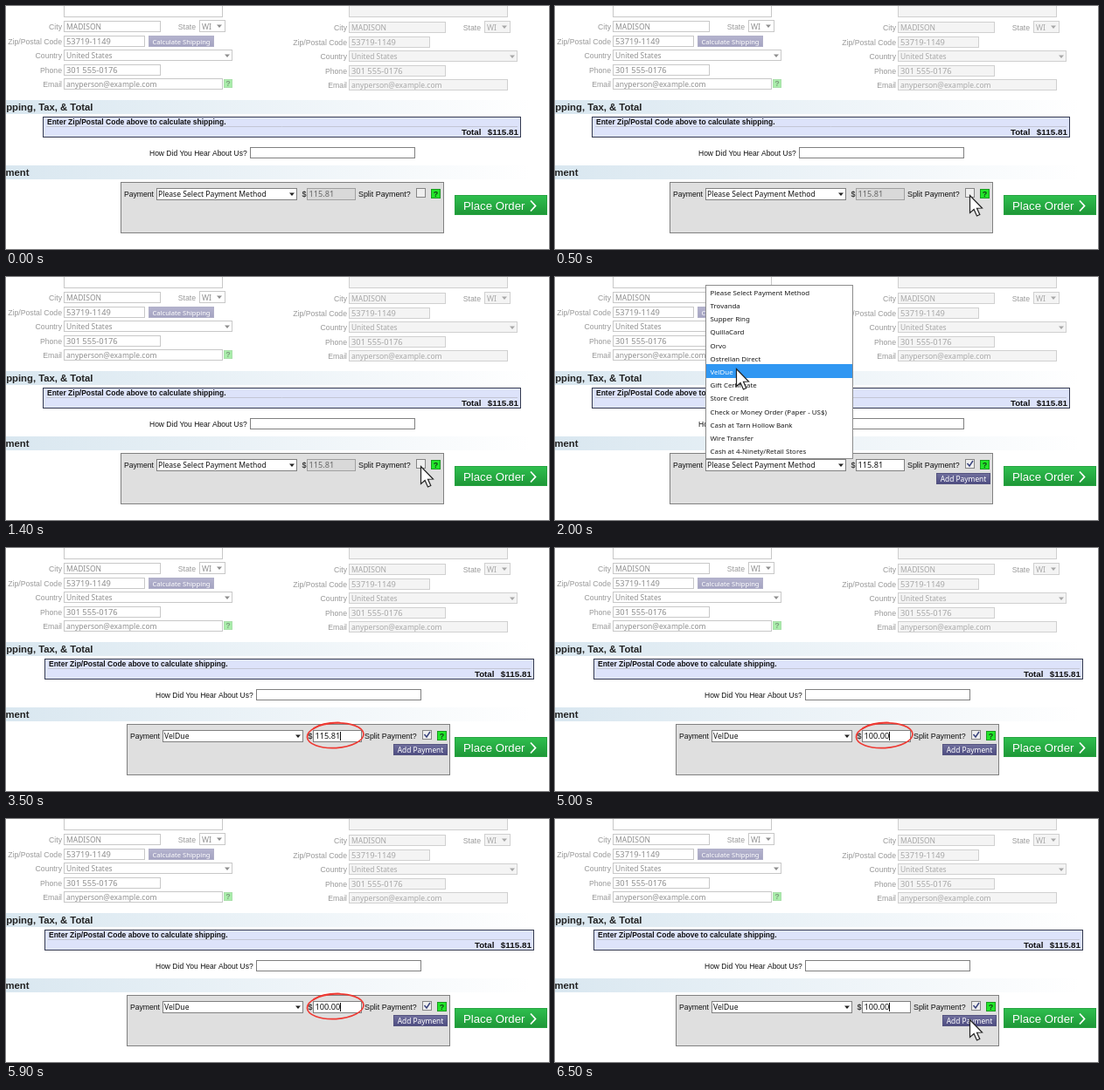
Animation, 621 px wide and 279 px high, one loop 8 s. Source, as an HTML page with a canvas:

```html
<!DOCTYPE html>
<html lang="en">
<head>
<meta charset="utf-8">
<title>Split payment checkout</title>
<style>
html, body { margin: 0; width: 100%; height: 100%; overflow: hidden; background: #fff; }
canvas { display: block; width: 621px; height: 279px; }
</style>
</head>
<body>
<canvas id="stage" width="621" height="279"></canvas>
<script>
const ctx = document.getElementById("stage").getContext("2d");
const LOOP = 8000;
const SANS = '"Liberation Sans", Arial, sans-serif';
const FORM = '"Noto Sans", "Open Sans", sans-serif';
const EDGE = "#808080";
const METHOD = "VelDue";
const OPTIONS = [
  "Please Select Payment Method", "Trovanda", "Supper Ring", "QuillaCard", "Orvo",
  "Ostrellan Direct", METHOD, "Gift Certificate", "Store Credit",
  "Check or Money Order (Paper - US$)", "Cash at Tarn Hollow Bank",
  "Wire Transfer", "Cash at 4-Ninety/Retail Stores"
];

// Each step holds until the next one starts.
const STEPS = [
  { at: 0, amount: "115.81" },
  { at: 500, amount: "115.81", cursor: [474, 217] },
  { at: 2000, amount: "115.81", split: true, open: true, cursor: [207, 105] },
  { at: 3500, amount: "115.81", split: true, chosen: true, ring: true },
  { at: 5000, amount: "100.00", split: true, chosen: true, ring: true },
  { at: 6500, amount: "100.00", split: true, chosen: true, cursor: [474, 230] }
];

function text(str, x, y, size, color = "#111", opt = {}) {
  ctx.font = `${opt.weight || "normal"} ${size}px ${opt.font || SANS}`;
  ctx.textAlign = opt.align || "left";
  ctx.fillStyle = color;
  ctx.fillText(str, x, y);
}

function formText(str, x, y, size, color, align) {
  text(str, x, y, size, color, { font: FORM, align });
}

function box(x, y, w, h, fill, border) {
  ctx.fillStyle = fill;
  ctx.fillRect(x, y, w, h);
  if (!border) return;
  ctx.strokeStyle = border;
  ctx.lineWidth = 1;
  ctx.strokeRect(x + 0.5, y + 0.5, w - 1, h - 1);
}

function shade(x0, y0, x1, y1, from, to) {
  const g = ctx.createLinearGradient(x0, y0, x1, y1);
  g.addColorStop(0, from);
  g.addColorStop(1, to);
  return g;
}

function line(points, color, width) {
  ctx.beginPath();
  points.forEach(([x, y]) => ctx.lineTo(x, y));
  ctx.strokeStyle = color;
  ctx.lineWidth = width;
  ctx.stroke();
}

function arrow(x, y, color) {
  ctx.beginPath();
  ctx.moveTo(x - 3, y - 1.5);
  ctx.lineTo(x + 3, y - 1.5);
  ctx.lineTo(x, y + 2);
  ctx.fillStyle = color;
  ctx.fill();
}

function help(x, y, size, fill, border, color) {
  box(x, y, size, size, fill, border);
  text("?", x + size / 2, y + size - 2, 9, color, { weight: "bold", align: "center" });
}

function button(str, x, y, w, size, top, bottom, border) {
  box(x, y, w, 13, shade(0, y, 0, y + 13, top, bottom), border);
  formText(str, x + w / 2, y + 9.6, size, "#fff", "center");
}

function address(x, dy, fill, border, ink) {
  const field = (label, value, y, w, size) => {
    text(label, x - 2, y + dy + 9.7, 8.7, "#999", { align: "right" });
    box(x, y + dy, w, 13, fill, border);
    formText(value, x + 3, y + dy + 9.8, size, ink);
  };
  box(x, -1, 182, 14, fill, border);
  field("City", "MADISON", 17, 111, 8.5);
  field("Zip/Postal Code", "53719-1149", 34, 93, 9.3);
  field("Country", "United States", 50, 193, 8.4);
  field("Phone", "301 555-0176", 67, 111, 9.3);
  field("Email", "anyperson@example.com", 83, 182, 8.5);
  arrow(x + 187, 57 + dy, ink);
  text("State", x + 151, 26.7 + dy, 8.7, "#999", { align: "right" });
  box(x + 155, 16 + dy, 30, 14, fill, border);
  formText("WI", x + 158, 26.8 + dy, 8.7, ink);
  arrow(x + 178, 23 + dy, ink);
}

function heading(str, y, right) {
  box(0, y, 621, 16, shade(0, 0, 600, 0, "#d9e7f0", "#ffffff"));
  text(str, right, y + 12.3, 11.3, "#222", { weight: "bold", align: "right" });
}

function totals(left, right) {
  box(left, 127, right - left, 24, "#dde3fa", "#34394f");
  line([[left + 4, 138.5], [right - 4, 138.5]], "#c3c6d4", 1);
  text("Enter Zip/Postal Code above to calculate shipping.", left + 5, 136, 8.5, "#111", { weight: "bold" });
  text("Total", right - 68, 148, 9.7, "#111", { weight: "bold" });
  text("$115.81", right - 3, 148, 9.9, "#111", { weight: "bold", align: "right" });
}

function payment(s, dx) {
  box(131 + dx, 202, 370, 59, "#dfdfdf", EDGE);
  text("Payment", 135 + dx, 218.5, 8.6);
  box(172 + dx, 209, 161, 14, "#fff", EDGE);
  formText(s.chosen ? METHOD : OPTIONS[0], 174 + dx, 219.3, 8.6, "#111");
  arrow(327 + dx, 216, "#222");
  text("$", 338.5 + dx, 219.3, 9);
  box(344 + dx, 209, 56, 14, s.split ? "#fff" : "#d9d9d9", s.split ? EDGE : "#a0a0a0");
  formText(s.amount, 346.5 + dx, 219.3, 9.2, s.split ? "#111" : "#666");
  if (s.chosen) box(382, 211, 1, 10, "#111");
  text("Split Payment?", 403 + dx, 219.3, 8.9);
  box(469 + dx, 209, 11, 11, "#efefef", "#858585");
  if (s.split) {
    line([[471.5 + dx, 214], [474 + dx, 217], [478 + dx, 211]], "#39437c", 1.5);
    button("Add Payment", 436 + dx, 225, 62, 8.4, "#73729f", "#4b4a80", "#555480");
  }
  help(486 + dx, 210, 11, "#22e52a", "#1c9a22", "#143c16");
}

function placeOrder() {
  box(513, 217, 106, 23, shade(0, 217, 0, 240, "#2fc04f", "#1d9636"), "#27a341");
  text("Place Order", 523, 234, 13.2, "#fff");
  line([[600, 223.5], [605.5, 229.5], [600, 235.5]], "#fff", 1.8);
}

function menu() {
  const pitch = 15.2;
  box(172, 9, 169, 200, "#fff", "#8c8c8c");
  OPTIONS.forEach((name, i) => {
    const picked = name === METHOD;
    if (picked) box(173, 100, 167, 16, "#3097f2");
    formText(name, 177.5, 20.8 + i * pitch, 7.9, picked ? "#fff" : "#1a1a1a");
  });
}

function ring() {
  ctx.strokeStyle = "#ee3a33";
  ctx.lineWidth = 1.7;
  ctx.lineCap = "round";
  ctx.beginPath();
  ctx.ellipse(376.7, 215.3, 32.3, 14.3, -0.06, 0, Math.PI * 2);
  ctx.stroke();
  ctx.beginPath();
  ctx.moveTo(352, 207);
  ctx.quadraticCurveTo(362, 200, 382, 200.5);
  ctx.stroke();
  ctx.lineCap = "butt";
}

function pointer([x, y]) {
  const shape = [[0, 0], [0, 20], [4.6, 16], [8, 23.5], [11.3, 22], [8, 14.7], [14, 14.5]];
  ctx.beginPath();
  shape.forEach(([px, py]) => ctx.lineTo(x + px + 0.5, y + py + 0.5));
  ctx.closePath();
  ctx.fillStyle = "#fff";
  ctx.fill();
  ctx.strokeStyle = "#222";
  ctx.lineWidth = 1.2;
  ctx.stroke();
}

function draw(s) {
  const dx = s.chosen ? 7 : 0;
  box(0, 0, 621, 279, "#fff");
  address(66, 0, "#fff", "#c8c8c8", "#8f8f8f");
  address(392, 1, "#f4f4f4", "#d0d0d0", "#a8a8a8");
  button("Calculate Shipping", 163, 34, 75, 7.6, "#b5b4cf", "#a3a2c0", "#b0afc8");
  help(249, 84, 10, "#a9eeaa", "#a8dfa9", "#7f9f80");
  heading("Shipping, Tax, & Total", 108, 99.5);
  if (s.chosen) totals(44, 604);
  else totals(42, 589);
  text("How Did You Hear About Us?", 164 + dx, 171.5, 8.5);
  box(279 + dx, 162, 189, 13, "#fff", EDGE);
  heading("Payment", 183, 26.5);
  payment(s, dx);
  placeOrder();
  if (s.open) menu();
  if (s.ring) ring();
  if (s.cursor) pointer(s.cursor);
}

const start = performance.now();
function tick() {
  const t = (performance.now() - start) % LOOP;
  draw(STEPS.filter(s => s.at <= t).pop());
  requestAnimationFrame(tick);
}
tick();
</script>
</body>
</html>
```
